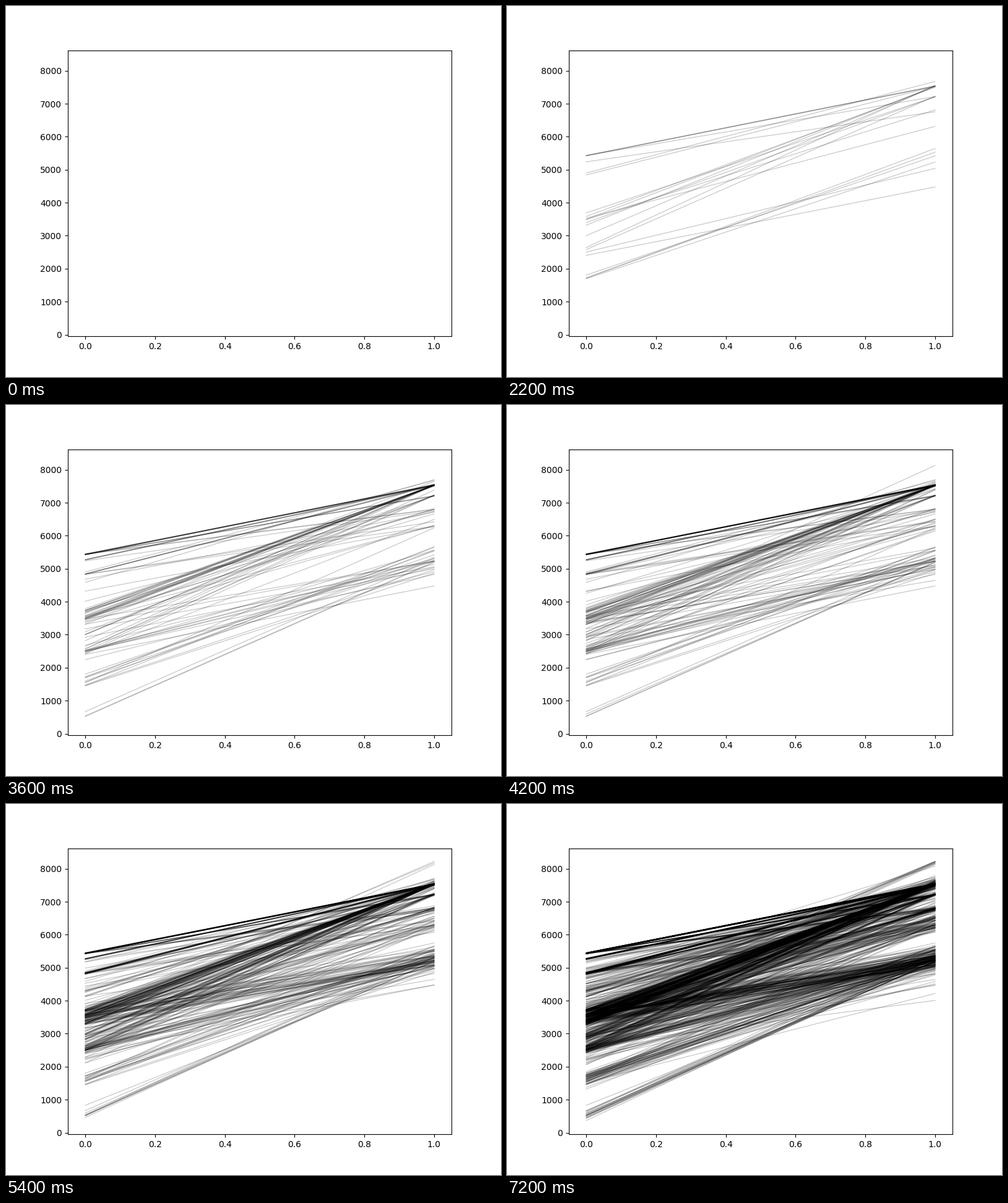
These frames come from a looping animation (800 px wide and 600 px high, 7.4 s). A matplotlib script:

```python
import numpy as np
import matplotlib.pyplot as plt
from matplotlib.animation import FuncAnimation
from matplotlib.collections import LineCollection

FRAMES = 37
INTERVAL = 200
LOW, HIGH = 348, 8218

# Values where lines gather, with their weights
STARTS = {5435: 10, 5265: 2, 4825: 5, 4300: 1, 3720: 3, 3550: 6,
          3360: 6, 2940: 2, 2520: 5, 1660: 2.5, 1470: 1.5, 500: 5}
ENDS = {8200: 2, 7530: 44, 7220: 8, 6780: 7, 6490: 5, 6285: 5, 5260: 30, 4250: 1}

rng = np.random.default_rng(11)


def pick(hubs):
    weights = np.array(list(hubs.values()), float)
    return rng.choice(list(hubs), p=weights / weights.sum())


def pick_line():
    """Join a start hub to an end hub; lower hubs are less sharp."""
    start, end = pick(STARTS), pick(ENDS)
    start_spread = 10 + 0.02 * (5435 - start)
    end_spread = 12 + 160 * ((7530 - end) / 2270) ** 2
    if rng.random() < 0.22:
        start = rng.uniform(1450, 5300)
        end_spread += 80
    start = np.clip(rng.normal(start, start_spread), LOW, 5450)
    end = min(rng.normal(end, end_spread), HIGH)
    return start, end


def fits(start, end):
    return 1300 < end - start < 4980 and 5630 < start + end < 13010


def build_lines(count):
    lines = []
    while len(lines) < count:
        start, end = pick_line()
        if fits(start, end):
            lines.append([(0, start), (1, end)])
    return lines


def line_count(frame):
    return frame + round(880 * (frame / (FRAMES - 1)) ** 3.6)


lines = build_lines(line_count(FRAMES - 1))
margin = 0.05 * (HIGH - LOW)

fig, ax = plt.subplots(figsize=(8, 6), dpi=100)
ax.set_xlim(-0.05, 1.05)
ax.set_ylim(LOW - margin, HIGH + margin)
bundle = LineCollection([], colors="black", alpha=0.2, linewidths=1,
                        capstyle="projecting")
ax.add_collection(bundle, autolim=False)


def draw(frame):
    bundle.set_segments(lines[:line_count(frame)])
    return (bundle,)


anim = FuncAnimation(fig, draw, frames=FRAMES, interval=INTERVAL,
                     init_func=lambda: draw(0), repeat=True, repeat_delay=0)
plt.show()
```
